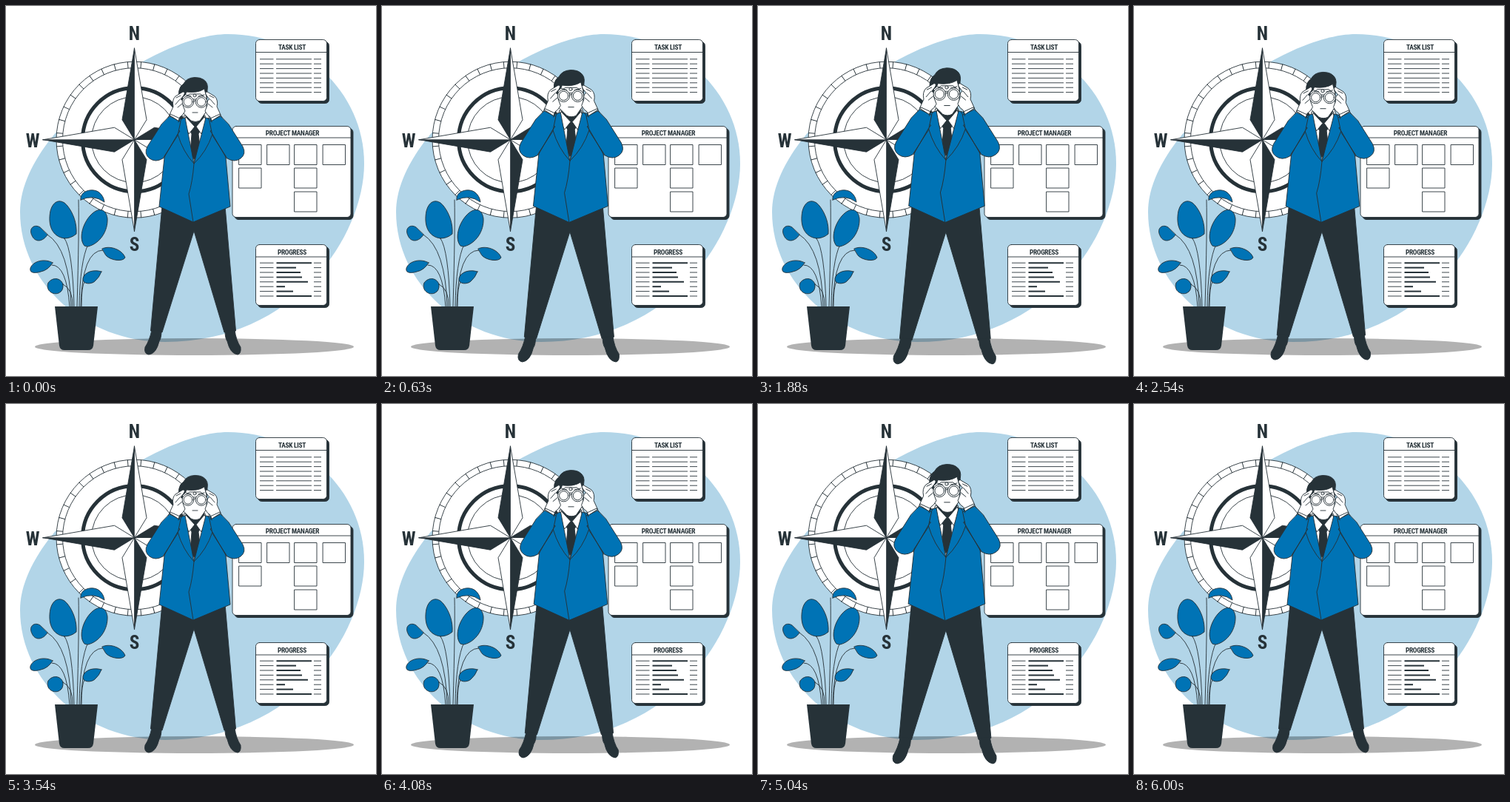
An HTML page for the animation above (6040 ms loop, 500 px wide and 500 px high).

```html
<!DOCTYPE html>
<html lang="en">
<head>
<meta charset="utf-8">
<title>Project outlook</title>
<style>
html, body { margin: 0; width: 100%; height: 100%; overflow: hidden; background: #fff; }
svg { display: block; width: 100vw; height: 100vh; }
.line { fill: none; stroke: #263238; stroke-width: .9; stroke-linecap: round; stroke-linejoin: round; }
.white { fill: #fff; }
.blue { fill: #0073b5; }
.dark { fill: #263238; }
text { font-family: "Roboto Condensed", "Liberation Sans Narrow", Roboto, sans-serif; font-stretch: 75%; font-weight: 700; fill: #263238; text-anchor: middle; }
.title { font-size: 9.4px; font-weight: 600; letter-spacing: -.3px; }
.pole { font-size: 25px; }
</style>
</head>
<body>
<svg viewBox="0 0 500 500">
  <path d="M19 278C19 171 200 38 300 38S484 116 484 213S390 454 215 454C107 454 19 375 19 278Z" fill="#b2d5e8"/>
  <ellipse cx="254.5" cy="460.5" rx="215.5" ry="11.5" opacity=".3"/>

  <g class="line" transform="translate(173.500 180.700)">
    <circle class="white" r="105.500"/>
    <g id="ticks"></g>
    <circle class="white" r="97"/>
    <circle r="70" stroke-width="5"/>
    <circle r="58"/>
    <g id="star"></g>
  </g>
  <text class="pole" x="173.500" y="45.500">N</text>
  <text class="pole" x="36" y="191">W</text>
  <text class="pole" x="173.500" y="331">S</text>

  <g id="cards"></g>

  <g class="line">
    <path d="M96 406Q99 300 98 262M92 406Q90 330 79 314M99 406Q100 345 111 322M88 406Q86 328 56 309M86 406Q82 350 62 350M101 406Q103 330 131 330M102 406Q102 378 106 373M90 406Q91 383 77 376"/>
    <g class="blue">
      <path d="M101 262C99 250 117 245 126 252Q132 257 133 265Q118 254 101 262Z"/>
      <path d="M79 314C63 312 56 297 60 277C64 262 75 260 83 270C91 280 96 294 95 308Q88 314 79 314Z"/>
      <path d="M106 324C98 315 103 295 114 283C124 272 135 273 137 287C138 304 127 321 111 325Z"/>
      <path d="M56 309C50 319 39 320 35 310C30 300 39 294 46 299Z"/>
      <path d="M63 347C53 341 37 344 33 354C31 362 41 361 47 359Q57 357 63 347Z"/>
      <path d="M130 328C140 323 157 329 161 340C158 346 141 344 135 337Z"/>
      <path d="M129 359C120 356 107 358 104 368C103 377 116 376 120 372Q126 367 129 359Z"/>
      <path d="M77 376C74 367 63 366 57 374C53 385 64 391 71 388Q78 385 77 376Z"/>
    </g>
  </g>
  <path class="dark" d="M66 406H124L118 459Q117 465 111 465H79Q73 465 72 459Z"/>

  <g id="man" class="line">
    <g class="dark">
      <path d="M211 270L195.500 439L211 441L254 304L295 441L310.500 439L296 270Z"/>
      <path d="M197 438L210 439Q210 449 207 453Q203 470 193 471Q186 470 188 461Q194 452 197 438Z"/>
      <path d="M309 438L296 439Q296 449 299 453Q303 470 313 471Q318 470 317 461Q311 452 309 438Z"/>
    </g>
    <path class="white" d="M241 148L269 148L272 165L256 213L238 165Z"/>
    <path class="dark" d="M243 144L268 144L267 153L256 164L244 153Z"/>
    <path class="dark" d="M251 162L260 162L262 169L260 173L263 199L256 209L249 199L251 173L249 169Z"/>
    <path class="white" d="M243 150L255 163L247 173L240 157ZM268 150L257 163L264 173L271 157Z"/>
    <path class="blue" d="M238 152L242 151L254 213L270 151L275 152L290 158L297 205L303 271L253 292L207 271L214 205L224 158Z"/>
    <path d="M238 152L229 166L235 169L232 173Q239 197 254 213M273 152L282 166L276 169L279 173Q271 197 254 213Q252 238 247 254L253 292"/>
    <path class="blue" d="M221 149L236 156L232 175L212 206Q202 212 194 206Q186 200 191 190L210 160Z"/>
    <path class="blue" d="M290 149L275 156L279 175L299 206Q309 212 317 206Q325 200 320 190L301 160Z"/>
    <path d="M232 173L213 206M279 173L298 206"/>
    <path class="dark" d="M235 132Q230 111 240 105Q244 97 255 96.500Q263 96.500 267 99.500Q274 104 272 114L271 132Z"/>
    <path class="white" d="M239 123Q243 121 244 116Q259 118 268 112L271 123V142L262 155Q256 158 250 155L240 145Z"/>
    <path d="M252 144H259"/>
    <g id="hands"></g>
    <path class="white" d="M242 124L248 119H263L269 124L264 126H247Z"/>
    <circle class="white" cx="255" cy="121" r="2"/>
    <path d="M250 122L243 120M260 122L268 120M253 128H257"/>
    <g id="lenses"></g>
  </g>
</svg>
<script>
const byId = id => document.getElementById(id);
const fill = (id, html) => { byId(id).innerHTML = html; };
const range = n => [...Array(n).keys()];
const rows = y => range(8).map(i => y + i * 6.4);

fill('ticks', range(36).map(i =>
  `<path d="M0 -105.500V-97" transform="rotate(${i * 10 + 5})"/>`).join(''));

// Each point of the star has one dark and one white half.
fill('star', [90, 180, 270, 0].map(a => `<g transform="rotate(${a})">
  <path class="dark" d="M0 0L-16.500 -27L0 -123.500Z"/>
  <path class="white" d="M0 0L16.500 -27L0 -123.500Z"/></g>`).join(''));

function card(x, y, w, h, title, head, body) {
  const box = `width="${w}" height="${h}" rx="5"`;
  return `<g class="line"><rect class="dark" x="${x + 3}" y="${y + 3}" ${box}/>
    <rect class="white" x="${x}" y="${y}" ${box}/>
    <path d="M${x} ${y + head}h${w}"/>${body}</g>
    <text class="title" x="${x + w / 2 + 1}" y="${y + head - 3.5}">${title}</text>`;
}
const dash = (x1, x2, y, w = .9) => `<path d="M${x1} ${y}H${x2}" stroke-linecap="butt" style="stroke-width:${w}"/>`;
const sides = y => dash(343, 361.5, y) + dash(416, 426, y);
const cell = ([x, y]) => `<rect x="${x}" y="${y}" width="30" height="27"/>`;
const cells = [[315, 187.5], [353, 187.5], [390, 187.5], [428.5, 187.5], [315, 219], [390, 219], [390, 251]];
const ends = [413, 392, 398, 400, 408, 377, 388, 413];

fill('cards',
  card(337.5, 45.5, 96, 83, 'TASK LIST', 17, rows(71.8).map(y => sides(y) + dash(365, 413, y)).join('')) +
  card(306, 162.5, 160, 123, 'PROJECT MANAGER', 15.5, cells.map(cell).join('')) +
  card(337.5, 322.5, 96, 82, 'PROGRESS', 16.5, rows(347.2).map((y, i) =>
    sides(y) + dash(365.5, ends[i], y, 2)).join('')));

const hand = `<path class="white" d="M221 147L226 136Q224 127 229 122L239 116Q243 116 240 121L236 126Q240 127 239 134L242 142Q239 148 235 150L233 155Z"/>
  <path d="M229 133L235 126M232 137L238 132M219 151L222 146L235 152L233 157M230 124L236 121"/>`;
fill('hands', `${hand}<g transform="matrix(-1 0 0 1 511 0)">${hand}</g>`);
fill('lenses', [246, 264].map(x => `<circle class="white" cx="${x}" cy="129.500" r="7.800"/>
  <circle cx="${x}" cy="129.500" r="5.800"/>`).join(''));

// Time in ms and size of the man.
const LOOP = 6040;
const keys = [[0, 1], [630, 1.053], [1130, 1.094], [1880, 1.068], [2540, 1.038], [3130, 1.007],
  [3500, 1], [4080, 1.037], [4380, 1.061], [4760, 1.091], [5040, 1.08], [5630, 1.014], [6040, 1]];

// Slope at a key: flat at ends and turning points.
function slope(i) {
  const a = keys[i - 1], b = keys[i], c = keys[i + 1];
  if (!a || !c || (b[1] - a[1]) * (c[1] - b[1]) <= 0) return 0;
  return (c[1] - a[1]) / (c[0] - a[0]);
}
function sizeAt(t) {
  const i = keys.findIndex((k, n) => n && t <= k[0]) - 1;
  const [t0, p] = keys[i], [t1, q] = keys[i + 1];
  const d = t1 - t0, u = (t - t0) / d, v = 1 - u;
  return p * v * v * (1 + 2 * u) + q * u * u * (3 - 2 * u) + d * u * v * (v * slope(i) - u * slope(i + 1));
}
const man = byId('man');
const start = performance.now();
function draw(now) {
  const s = sizeAt(Math.max(0, now - start) % LOOP);
  man.setAttribute('transform', `translate(255.500 283.300) scale(${s}) translate(-255.500 -283.300)`);
  requestAnimationFrame(draw);
}
draw(start);
</script>
</body>
</html>
```
